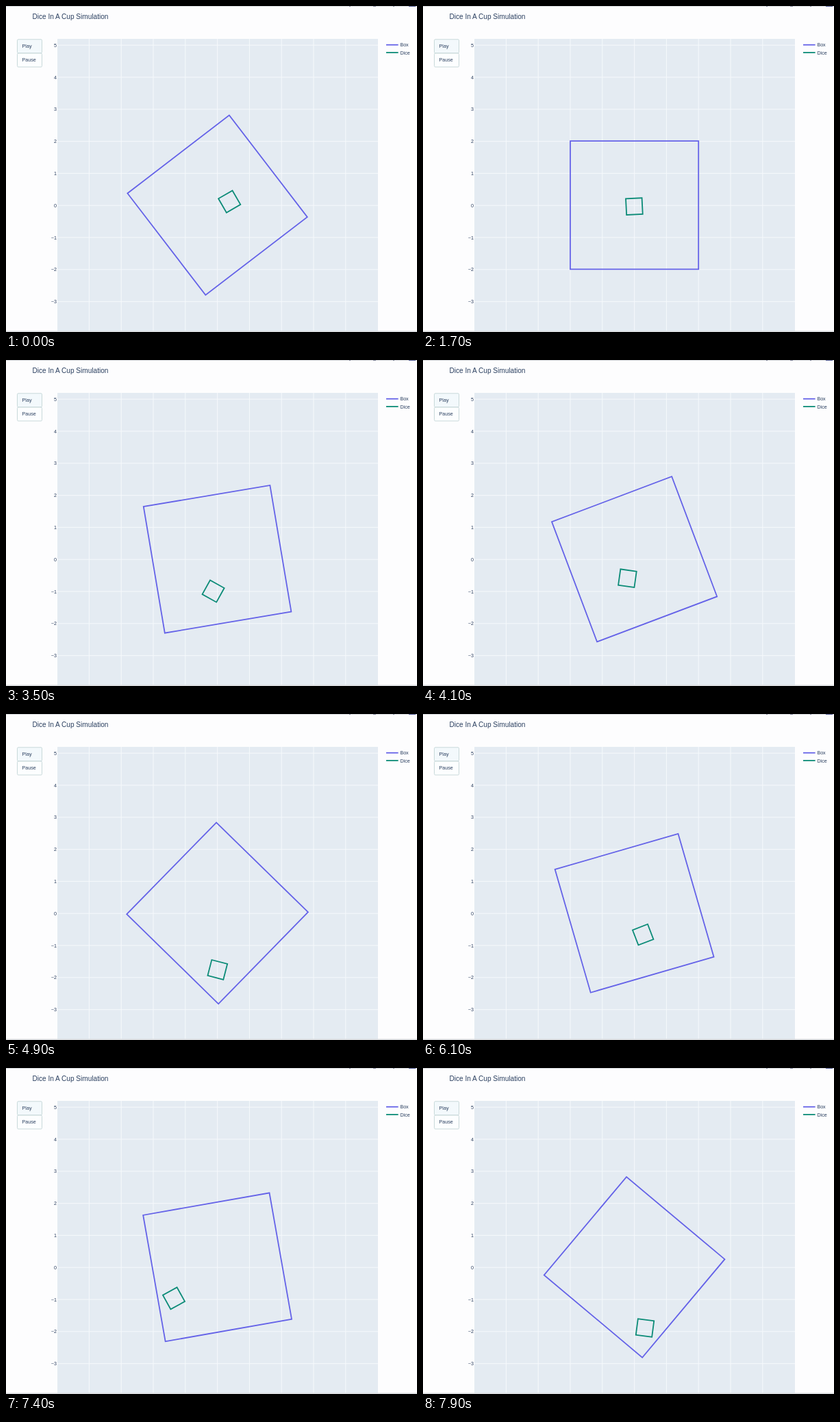
Animation of 600x476 px, one loop 8000 ms. Source, as an HTML page:

```html
<!DOCTYPE html>
<html lang="en">
<head>
<meta charset="utf-8">
<title>Dice In A Cup Simulation</title>
<style>
  html, body { margin: 0; width: 100%; height: 100%; overflow: hidden; background: #fdfdfe; }
  svg { display: block; }
  text { font: 7.15px "Liberation Sans", Arial, sans-serif; fill: #2a3f5f; }
  .title { font-size: 10.1px; }
  .tick { text-anchor: end; }
  .grid { stroke: #f6f9fc; stroke-width: 1; }
  .box, .dice { fill: none; stroke-width: 1.8; }
  .box { stroke: #6462e8; }
  .dice { stroke: #0b8b77; }
  .button { fill: #fcfeff; stroke: #c3d5d6; stroke-width: .9; }
  .active { fill: #f3f9fc; }
</style>
</head>
<body>
<svg width="600" height="476" viewBox="0 0 600 476">
  <rect width="600" height="1" fill="#d3d5da"/>
  <path d="M501 .5h2M536 .5h4M565 .5h2" stroke="#777d92"/>
  <path d="M588 .5h10" stroke="#4a5590"/>
  <rect x="75" y="48" width="468" height="427" fill="#e4ebf2"/>
  <g id="axes"></g>
  <rect y="474.4" width="600" height="1.6" fill="#d9dbde"/>
  <text class="title" x="38.4" y="18.6">Dice In A Cup Simulation</text>
  <rect class="button active" x="16.5" y="48.8" width="36" height="20" rx="1.5"/>
  <rect class="button" x="16.5" y="69" width="36" height="20" rx="1.5"/>
  <text x="23.6" y="60.9">Play</text>
  <text x="23.6" y="81.3">Pause</text>
  <path class="box" d="M555 56.7h17.6"/>
  <path class="dice" d="M555 68h17.6"/>
  <text x="575.4" y="59.4">Box</text>
  <text x="575.4" y="70.7">Dice</text>
  <rect id="box" class="box" x="-93.6" y="-93.6" width="187.2" height="187.2"/>
  <rect id="dice" class="dice" x="-11.8" y="-11.8" width="23.6" height="23.6"/>
</svg>
<script>
const LOOP = 8000, STEP = 100, START = 16;
const CX = 308.6, CY = 291.2, UNIT = 46.8;
const GRAVITY = 3.14; // px per step squared

// step, box angle in degrees
const turns = [[16, 0], [28, 2.6], [41, 20.66], [49, 45.65], [61, 106.15], [74, 190], [79, 230]];
// step, x, y, tilt: bounces and points along the flight
const hops = [
  [16, 308.6, 291, 0], [23, 307, 368, 20], [28, 307, 330, 35.5], [33, 304, 369, 54],
  [41, 298.4, 318.7, 82], [46, 304, 386, 78], [49, 308.8, 373.4, 75.5], [52, 311, 379, 84],
  [61, 321.2, 322.2, 111], [65.5, 296, 373, 114], [74, 245, 336.3, 119], [79, 324, 379.5, 82.5]
];

const lerp = (a, b, u) => a + (b - a) * u;
const slope = i => (turns[i + 1][1] - turns[i][1]) / (turns[i + 1][0] - turns[i][0]);

function segment(keys, t) {
  let i = 0;
  while (i < keys.length - 2 && t >= keys[i + 1][0]) i++;
  return i;
}

function tangent(i) {
  if (i === 0) return 0;
  if (i === turns.length - 1) return 8.2;
  const before = turns[i][0] - turns[i - 1][0], after = turns[i + 1][0] - turns[i][0];
  return (slope(i - 1) * after + slope(i) * before) / (before + after);
}

function boxAngle(t) {
  const i = segment(turns, t), [t0, a] = turns[i], [t1, b] = turns[i + 1];
  const span = t1 - t0, u = (t - t0) / span, v = 1 - u;
  return a * v * v * (1 + 2 * u) + b * u * u * (3 - 2 * u)
    + span * u * v * (tangent(i) * v - tangent(i + 1) * u);
}

function dicePose(t) {
  const i = segment(hops, t), [t0, x0, y0, r0] = hops[i], [t1, x1, y1, r1] = hops[i + 1];
  const u = (t - t0) / (t1 - t0);
  const lift = GRAVITY / 2 * (t - t0) * (t1 - t);
  return [lerp(x0, x1, u), lerp(y0, y1, u) - lift, lerp(r0, r1, u)];
}

function drawAxes() {
  let out = "";
  for (let n = -4; n <= 4; n++) {
    const x = CX + n * UNIT;
    out += `<path class="grid" d="M${x} 48V474.4"/>`;
  }
  for (let n = -3; n <= 5; n++) {
    const y = CY - n * UNIT;
    out += `<path class="grid" d="M75 ${y}H543"/>`
      + `<text class="tick" x="74" y="${y + 2.6}">${n < 0 ? "\u2212" + -n : n}</text>`;
  }
  document.getElementById("axes").innerHTML = out;
}

const box = document.getElementById("box"), dice = document.getElementById("dice");

function place(el, x, y, angle) {
  el.setAttribute("transform", `translate(${x} ${y}) rotate(${-angle})`);
}

function render() {
  const t = Math.floor(performance.now() % LOOP / STEP);
  const paused = t < START;
  place(box, CX, CY - .4, paused ? 37.5 : boxAngle(t));
  place(dice, ...(paused ? [326.2, 285.6, 30] : dicePose(t)));
  requestAnimationFrame(render);
}

drawAxes();
render();
</script>
</body>
</html>
```
